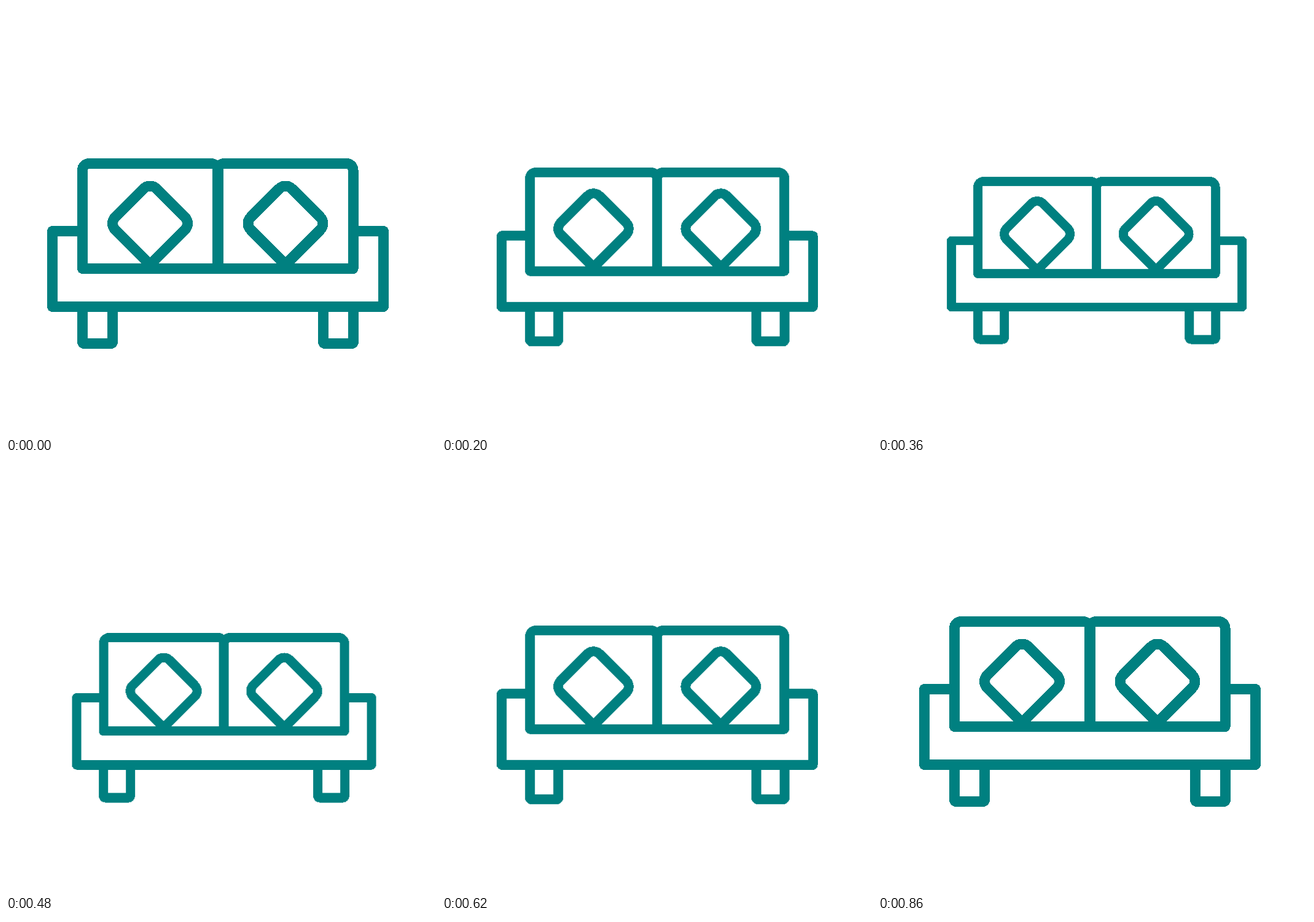
Recreate the animation shown at these times as an HTML page. Size 700 by 700 pixels, loop 3 s.

```html
<!DOCTYPE html>
<html lang="en">
<head>
<meta charset="utf-8">
<title>Sofa</title>
<style>
  html, body { margin: 0; width: 100%; height: 100%; overflow: hidden; background: #fff; }
  svg { display: block; width: 100%; height: 100%; }
  #sofa {
    fill: none;
    stroke: #008080;
    stroke-width: 17;
    stroke-linejoin: round;
    shape-rendering: crispEdges;
    transform-origin: 436px 494px;
  }
</style>
</head>
<body>
<svg viewBox="0 0 700 700">
  <defs>
    <path id="cushion" d="M124.5 427.5V267a10.5 10.5 0 0 1 10.5-10.5H334a10.5 10.5 0 0 1 10.5 10.5V427.5Z"/>
    <path id="pillow" d="M177.75 364.25a14.5 14.5 0 0 1 0-20.5l46.5-46.5a14.5 14.5 0 0 1 20.5 0l46.5 46.5a14.5 14.5 0 0 1 0 20.5L234.5 421Z"/>
    <path id="leg" d="M124.5 489.5V546.5a3 3 0 0 0 3 3h43a3 3 0 0 0 3-3V489.5"/>
  </defs>
  <g id="sofa">
    <path d="M124.5 366.5H75.5V489.5H614.5V366.5H565"/>
    <use href="#cushion"/>
    <use href="#cushion" x="220.5"/>
    <use href="#pillow"/>
    <use href="#pillow" x="220.5"/>
    <use href="#leg"/>
    <use href="#leg" x="392"/>
  </g>
</svg>
<script>
  const LOOP = 3000, STEP = 20;

  // time in ms, scale, easing towards the next pose
  const poses = [
    [0, 1, 'linear'],
    [20, 1, 'cubic-bezier(.1, 0, .833, .833)'],
    [400, 0.8625, 'cubic-bezier(.167, .167, .775, 1)'],
    [860, 1, 'linear'],
    [LOOP, 1, 'linear']
  ];

  const squeeze = document.getElementById('sofa').animate(
    poses.map(([time, scale, easing]) => ({
      offset: time / LOOP,
      transform: `scale(${scale})`,
      easing
    })),
    { duration: LOOP, iterations: Infinity }
  );
  squeeze.pause();

  const start = performance.now();
  function draw() {
    const time = (performance.now() - start) % LOOP;
    squeeze.currentTime = Math.floor(time / STEP) * STEP;
    requestAnimationFrame(draw);
  }
  draw();
</script>
</body>
</html>
```
